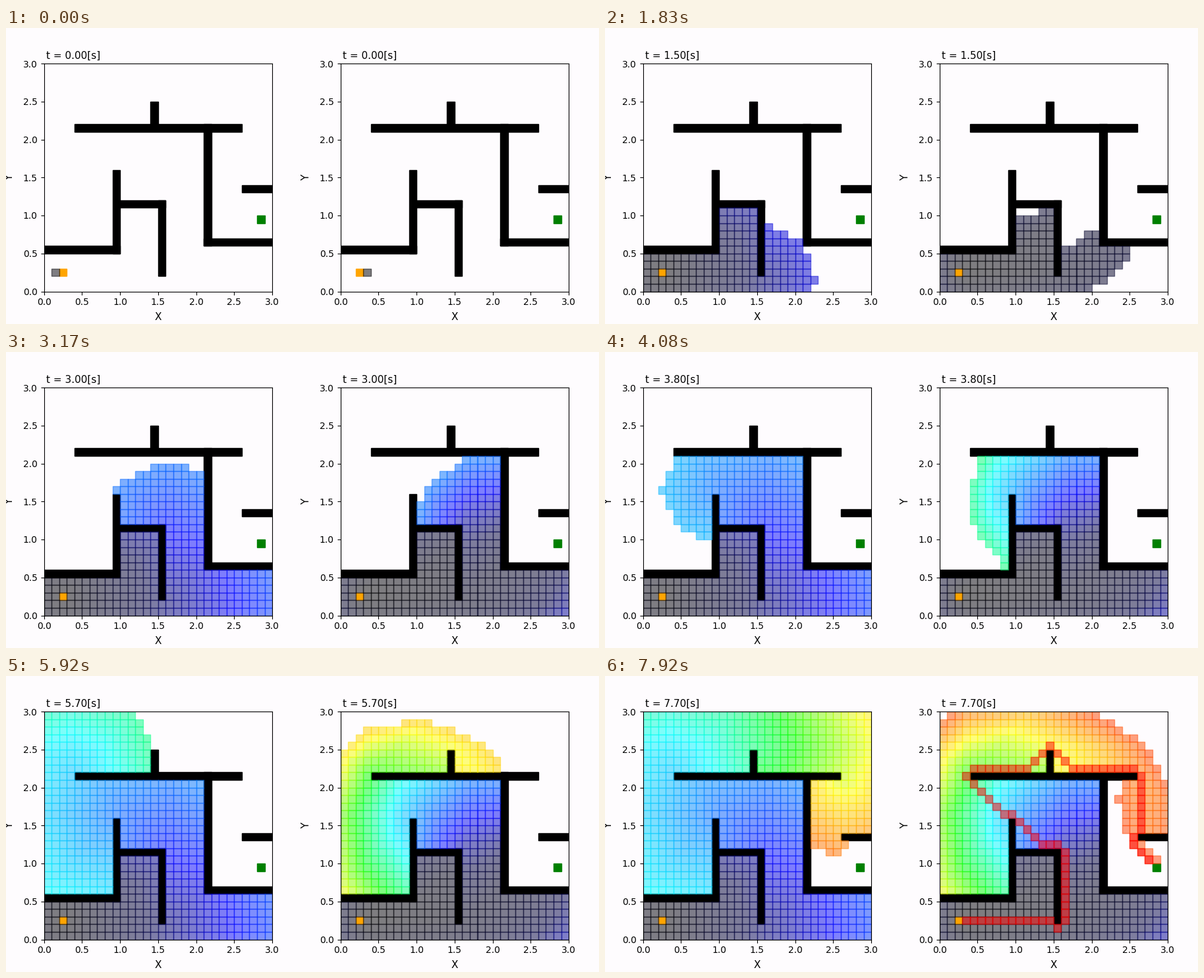
Write a matplotlib script that moves like this. It is 900 px wide and 450 px high and loops after 8000 ms.

```python
import math

import numpy as np
import matplotlib.pyplot as plt
from matplotlib.animation import FuncAnimation
from matplotlib.collections import PolyCollection
from matplotlib.patches import Rectangle

SIZE, CELL = 30, 0.1
START, GOAL = (2, 2), (28, 9)
FRAMES, FPS = 96, 12
BACK = "#fefcfe"

# column, row, width, height in cells
WALLS = [(4, 21, 22, 1), (14, 22, 1, 3), (21, 6, 1, 16), (21, 6, 9, 1),
         (26, 13, 4, 1), (9, 5, 1, 11), (0, 5, 10, 1), (10, 11, 6, 1),
         (15, 2, 1, 10)]
BLOCKED = {(x + i, y + j) for x, y, w, h in WALLS
           for i in range(w) for j in range(h)}

# corners of the shortest route
ROUTE = [(3, 2), (14, 2), (15, 1), (16, 2), (16, 11), (15, 12), (13, 12),
         (9, 16), (8, 16), (3, 21), (4, 22), (11, 22), (14, 25), (17, 22),
         (25, 22), (26, 21), (26, 14), (25, 13), (25, 12), (27, 10)]

# cost scale: black, blue, cyan, lime, yellow, red-orange
STOPS = [0, 0.143, 0.286, 0.58, 0.73, 0.86, 1]
RED = [0, 0, 0, 0, 0, 1, 1]
GREEN = [0, 0, 0, 1, 1, 1, 0.25]
BLUE = [0, 0.25, 1, 1, 0, 0, 0]


def search(weight):
    """Best-first search; weight 0 is Dijkstra, otherwise A*."""
    def score(cell, cost):
        return cost / 10 + weight * math.dist(cell, GOAL)

    cost = {START: 0}
    queue = {START: score(START, 0)}
    closed, order, scores = set(), [], []
    while queue:
        cell = min(queue, key=lambda c: (queue[c], c))
        scores.append(queue.pop(cell))
        order.append(cell)
        closed.add(cell)
        if cell == GOAL:
            break
        for dx in (-1, 0, 1):
            for dy in (-1, 0, 1):
                nxt = (cell[0] + dx, cell[1] + dy)
                if nxt in closed or nxt in BLOCKED:
                    continue
                if not (0 <= nxt[0] < SIZE and 0 <= nxt[1] < SIZE):
                    continue
                new = cost[cell] + (14 if dx and dy else 10)
                if new < cost.get(nxt, math.inf):
                    cost[nxt] = new
                    queue[nxt] = score(nxt, new)
    low, high = scores[0], scores[-1]
    level = (np.array(scores[1:-1]) - low) / (high - low)
    return order[1:-1], level


def square(cell):
    x, y = cell[0] * CELL, cell[1] * CELL
    return [(x, y), (x + CELL, y), (x + CELL, y + CELL), (x, y + CELL)]


def route_cells():
    cells = [ROUTE[0]]
    for (x0, y0), (x1, y1) in zip(ROUTE, ROUTE[1:]):
        n = max(abs(x1 - x0), abs(y1 - y0))
        cells += [(x0 + (x1 - x0) * k // n, y0 + (y1 - y0) * k // n)
                  for k in range(1, n + 1)]
    return cells


def block(ax, x, y, w, h, color):
    ax.add_patch(Rectangle((x * CELL, y * CELL), w * CELL, h * CELL,
                           facecolor=color, edgecolor=color))


class Panel:
    def __init__(self, fig, left, weight):
        ax = fig.add_axes([left, 0.11, 0.385, 0.77], facecolor=BACK)
        ax.set(xlim=(0, 3), ylim=(0, 3))
        ax.set_xticks(np.arange(0, 3.1, 0.5))
        ax.set_yticks(np.arange(0, 3.1, 0.5))
        ax.text(0.5, -0.113, "X", transform=ax.transAxes, fontsize=11,
                ha="center", va="center")
        ax.text(-0.151, 0.5, "Y", transform=ax.transAxes, fontsize=11,
                ha="center", va="center", rotation=90)
        self.clock = ax.text(0.01, 1.02, "", transform=ax.transAxes,
                             fontsize=11)
        for wall in WALLS:
            block(ax, *wall, "black")
        block(ax, *START, 1, 1, "orange")
        block(ax, *GOAL, 1, 1, "green")

        order, level = search(weight)
        self.squares = [square(c) for c in order]
        self.colors = np.column_stack(
            [np.interp(level, STOPS, ch) for ch in (RED, GREEN, BLUE)]
            + [np.full(len(level), 0.5)])
        self.cells = PolyCollection([], linewidths=1, zorder=1.5)
        ax.add_collection(self.cells, autolim=False)
        self.route = PolyCollection([square(c) for c in route_cells()],
                                    facecolors=(1, 0, 0, 0.5),
                                    edgecolors=(1, 0, 0, 0.5),
                                    linewidths=1, zorder=1.6)
        ax.add_collection(self.route, autolim=False)

    def show(self, step):
        count = 10 * step + 1
        self.clock.set_text(f"t = {step / 10:.2f}[s]")
        self.cells.set_verts(self.squares[:count])
        self.cells.set_facecolor(self.colors[:count])
        self.cells.set_edgecolor(self.colors[:count])
        self.route.set_visible(count > len(self.squares))


fig = plt.figure(figsize=(9, 4.5), dpi=100, facecolor=BACK)
panels = [Panel(fig, 0.064, 0), Panel(fig, 0.564, 0.9)]


def update(frame):
    # ten steps a second shown at twelve frames: every sixth one is held
    step = max(0, frame - (frame + 3) // 6 - 2)
    for panel in panels:
        panel.show(step)
    return []


anim = FuncAnimation(fig, update, frames=FRAMES, interval=1000 / FPS,
                     init_func=lambda: update(0), repeat=True, repeat_delay=0)
plt.show()
```
